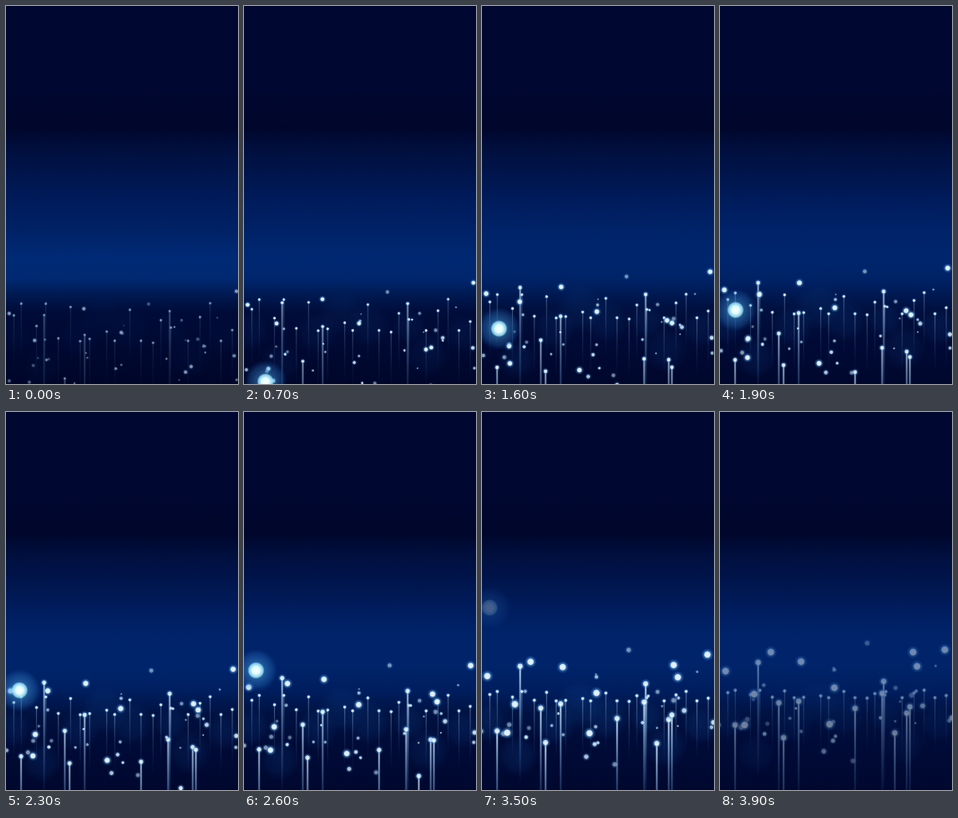
An HTML page that plays this animation: 292 px wide and 477 px high, repeating every 4 s.

```html
<!DOCTYPE html>
<html lang="en">
<head>
<meta charset="utf-8">
<title>Rising lights</title>
<style>
html, body { margin: 0; width: 100%; height: 100%; overflow: hidden; background: #000627; }
svg { display: block; width: 292px; height: 477px; }
</style>
</head>
<body>
<svg viewBox="0 0 292 477">
  <defs>
    <linearGradient id="sky" x1="0" y1="0" x2="0" y2="1">
      <stop offset="0" stop-color="#000831"/>
      <stop offset=".2" stop-color="#000731"/>
      <stop offset=".32" stop-color="#00062b"/>
      <stop offset=".37" stop-color="#000e3c"/>
      <stop offset=".5" stop-color="#001a58"/>
      <stop offset=".6" stop-color="#002267"/>
      <stop offset=".66" stop-color="#002a75"/>
      <stop offset=".72" stop-color="#002972"/>
      <stop offset=".76" stop-color="#001b53"/>
      <stop offset=".81" stop-color="#000b37"/>
      <stop offset="1" stop-color="#000629"/>
    </linearGradient>
    <linearGradient id="haze" x1="0" y1="0" x2="0" y2="1">
      <stop offset="0" stop-color="#001e60" stop-opacity="0"/>
      <stop offset=".2" stop-color="#00236a"/>
      <stop offset=".36" stop-color="#002369"/>
      <stop offset=".48" stop-color="#001e5e"/>
      <stop offset=".6" stop-color="#001242"/>
      <stop offset=".75" stop-color="#000b37"/>
      <stop offset="1" stop-color="#00082f"/>
    </linearGradient>
    <linearGradient id="tail" x1="0" y1="0" x2="0" y2="1">
      <stop offset="0" stop-color="#d6ecff"/>
      <stop offset=".3" stop-color="#8cb8e4" stop-opacity=".75"/>
      <stop offset="1" stop-color="#3a74bc" stop-opacity="0"/>
    </linearGradient>
    <radialGradient id="dot">
      <stop offset="0" stop-color="#fff"/>
      <stop offset=".42" stop-color="#def4ff"/>
      <stop offset=".56" stop-color="#6fbcf4" stop-opacity=".5"/>
      <stop offset="1" stop-color="#1c66c4" stop-opacity="0"/>
    </radialGradient>
    <radialGradient id="orb">
      <stop offset="0" stop-color="#fff"/>
      <stop offset=".18" stop-color="#dcfbff"/>
      <stop offset=".33" stop-color="#8fdcf5" stop-opacity=".9"/>
      <stop offset=".4" stop-color="#3f8fd0" stop-opacity=".5"/>
      <stop offset=".75" stop-color="#2a78c4" stop-opacity=".3"/>
      <stop offset="1" stop-color="#1c66c4" stop-opacity="0"/>
    </radialGradient>
    <radialGradient id="soft">
      <stop offset="0" stop-color="#1656a8"/>
      <stop offset=".6" stop-color="#1656a8" stop-opacity=".7"/>
      <stop offset="1" stop-color="#1656a8" stop-opacity="0"/>
    </radialGradient>
  </defs>
  <rect width="292" height="477" fill="url(#sky)"/>
  <rect id="mist" y="235" width="292" height="242" fill="url(#haze)"/>
  <g id="lights"></g>
</svg>
<script>
const LOOP = 4000, STEP = 100, END = 3900, WIDTH = 292;
const mist = document.getElementById('mist');
const lights = document.getElementById('lights');

// Tall streaks: x, start y, end y
const tall = [
  [48, 390, 316], [99, 415, 365], [206, 385, 340], [74, 470, 367],
  [19, 510, 395], [80, 505, 411], [170, 570, 374], [204, 525, 355],
  [220, 608, 405], [235, 505, 380], [239, 530, 372]
];

// Large bokeh: start point, end point
const bokeh = [
  [145, 412, 144, 348], [226, 462, 243, 303], [233, 455, 248, 321],
  [290, 360, 283, 300], [98, 382, 102, 315], [4, 388, 7, 327],
  [36, 422, 64, 303], [28, 480, 43, 356], [38, 490, 31, 395],
  [112, 505, 138, 394]
];

let seed = 11;
const rand = (lo, hi) => {
  seed = (seed * 16807) % 2147483647;
  return lo + (hi - lo) * seed / 2147483647;
};
const mix = (a, b, u) => a + (b - a) * u;
const clamp = v => Math.max(0, Math.min(1, v));
const ease = u => 1 - (1 - u) ** 1.2;

function set(el, attrs) {
  for (const k in attrs) {
    const v = attrs[k];
    el.setAttribute(k, typeof v === 'number' ? v.toFixed(2) : v);
  }
}
function add(tag, attrs) {
  const el = document.createElementNS('http://www.w3.org/2000/svg', tag);
  set(el, attrs);
  return lights.appendChild(el);
}
const disc = (fill, opacity = 1) => add('circle', { fill: `url(#${fill})`, opacity });

const parts = [];
const repeat = (n, make) => { for (let i = 0; i < n; i++) make(i); };

function glow(x, y, r) {
  const el = disc('soft');
  parts.push(u => set(el, { cx: x, cy: y - 25 * u, r, opacity: mix(.08, .2, u) }));
}

function streak(x, y0, y1, { width, height, glare, head }) {
  const tail = add('rect', { x: x - width / 2, width, height, fill: 'url(#tail)' });
  const tip = disc('dot', .9);
  parts.push(u => {
    const y = mix(y0, y1, ease(u));
    set(tail, { y, opacity: mix(glare / 2, glare, u) });
    set(tip, { cx: x, cy: y, r: mix(2.8, head, u) });
  });
}

function drift(x0, y0, x1, y1, r0, r1, opacity) {
  const el = disc('dot', opacity);
  parts.push(u => set(el, { cx: mix(x0, x1, u), cy: mix(y0, y1, u), r: mix(r0, r1, u) }));
}

repeat(8, i => glow((i + rand(.2, .8)) * WIDTH / 8, rand(370, 470), rand(20, 34)));

// Thin streaks that gather near the horizon
repeat(20, i => {
  const y = rand(375, 425);
  streak((i + rand(.2, .8)) * WIDTH / 20, y, mix(345, y, .2),
    { width: 1.1, height: 75, glare: .5, head: 3.6 });
});
tall.forEach(([x, y0, y1]) =>
  streak(x, y0, y1, { width: 2.4, height: 150, glare: .85, head: 7 }));

repeat(30, () => {
  const x = rand(0, WIDTH), y = rand(375, 500), r = rand(1.4, 4);
  drift(x, y, x + rand(-6, 6), y - rand(35, 90), r, r * 1.6, rand(.4, .9));
});
bokeh.forEach(p => drift(...p, 4, 8.6, .95));

const orb = disc('orb');
parts.push((u, ms) => {
  const s = ms / 1000;
  set(orb, {
    cx: 31.4 - 6.25 * s, cy: 522 - 66 * s - 3.6 * s * s, r: 27,
    opacity: clamp((3700 - ms) / 700)
  });
});

function draw(now) {
  const ms = Math.floor(now % LOOP / STEP) * STEP;
  const u = ms / END;
  parts.forEach(part => part(u, ms));
  set(mist, { opacity: clamp(ms / 2600) });
  set(lights, { opacity: Math.min(.6 + ms / 900, 1, .5 + (END - ms) / 800) });
}

const start = performance.now();
function tick() {
  draw(performance.now() - start);
  requestAnimationFrame(tick);
}
tick();
</script>
</body>
</html>
```
